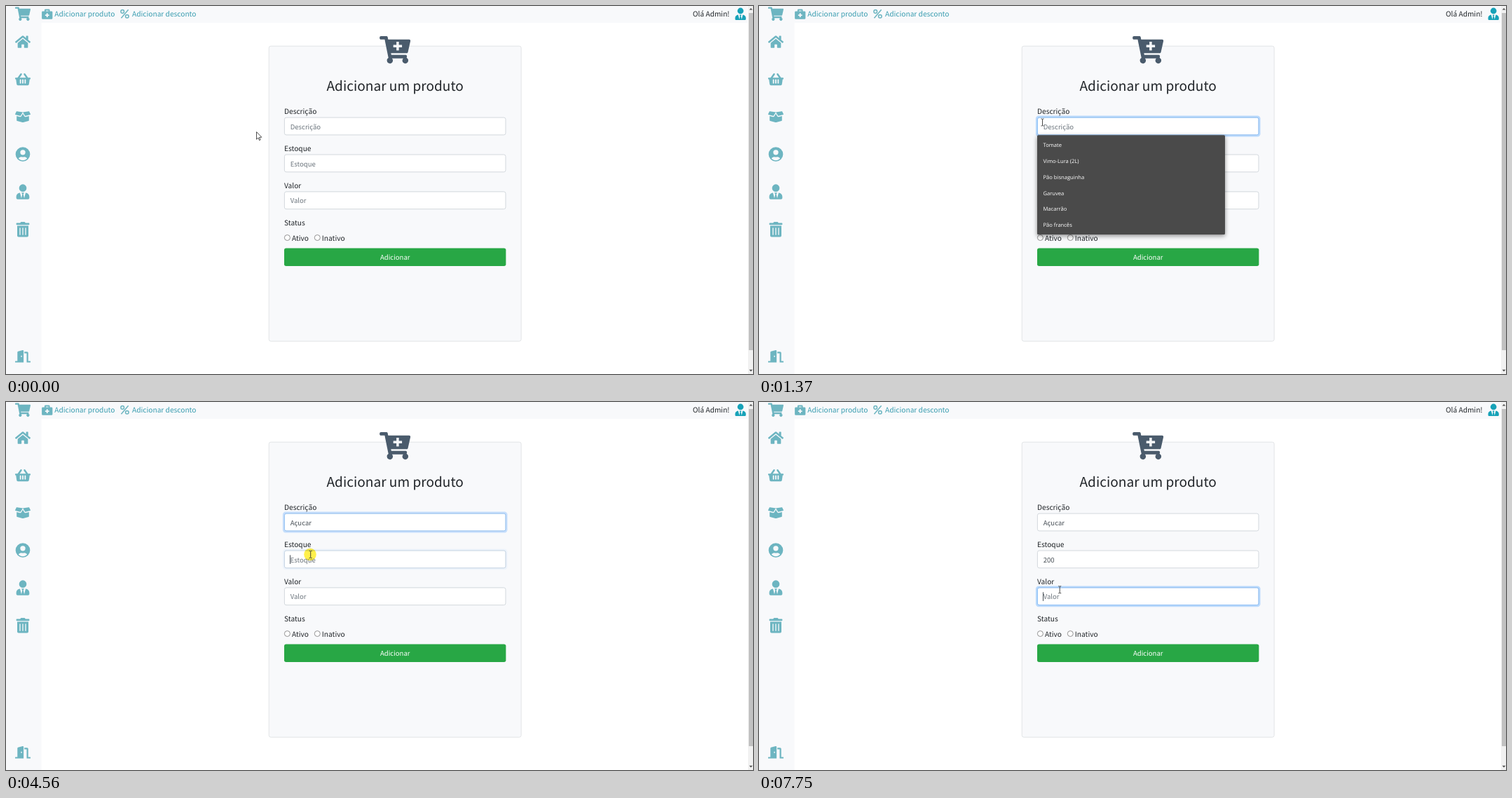
Recreate the animation shown at these times as an HTML page with a canvas. Size 1066 by 525 pixels, loop 8000 ms.

```html
<!DOCTYPE html>
<html lang="pt">
<head>
<meta charset="utf-8">
<title>Adicionar um produto</title>
<style>
html, body { margin: 0; width: 100%; height: 100%; overflow: hidden; background: #fff; }
canvas { display: block; width: 1066px; height: 525px; }
</style>
</head>
<body>
<canvas id="stage"></canvas>
<script>
const W = 1066, H = 525, LOOP = 8000;
const canvas = document.getElementById('stage');
const dpr = window.devicePixelRatio || 1;
canvas.width = W * dpr;
canvas.height = H * dpr;
const ctx = canvas.getContext('2d');

const SANS = '"Noto Sans CJK JP", "Noto Sans CJK SC", "Noto Sans CJK KR", "Noto Sans CJK", sans-serif';
const MENU = '"Open Sans", "Noto Sans", sans-serif';
const PANEL = '#f8f9fb', TEAL = '#6db5c1', LINK = '#3a9db0', INK = '#212529';
const LABEL = 10.18, FIELD = 9.55, TITLE = 19.1;

const ICONS = {
  cart: 'M528 301l47-208C579 78 567 64 552 64H159l-9-45C148 8 138 0 127 0H24C11 0 0 11 0 24v16c0 13 11 24 24 24h70l70 343c-17 10-28 28-28 49a56 56 0 1 0 95-40h210a56 56 0 1 0 63-10l6-25c3-15-8-29-23-29H218l-7-32h294c11 0 20-8 23-19z',
  home: 'M281 150L96 302v164a16 16 0 0 0 16 16h112a16 16 0 0 0 16-16v-96a16 16 0 0 1 16-16h64a16 16 0 0 1 16 16v96a16 16 0 0 0 16 16h112a16 16 0 0 0 16-16V302L295 150a12 12 0 0 0-14 0zM572 251l-84-69V44a12 12 0 0 0-12-12h-56a12 12 0 0 0-12 12v72l-90-74a48 48 0 0 0-60 0L4 251a12 12 0 0 0-2 17l26 31a12 12 0 0 0 17 2L281 108a12 12 0 0 1 14 0l236 193a12 12 0 0 0 17-2l26-31a12 12 0 0 0-2-17z',
  basket: 'M576 216v16c0 13-11 24-24 24h-8l-26 182a48 48 0 0 1-47 42H105a48 48 0 0 1-47-42L32 256h-8c-13 0-24-11-24-24v-16c0-13 11-24 24-24h67L198 45a32 32 0 0 1 52 38L171 192h234L326 83a32 32 0 0 1 52-38l107 147h67c13 0 24 11 24 24z' + slots([176, 264, 352], 48, 280, 112),
  box: 'M426 256c-17 0-33-9-41-23L320 126l-65 107c-8 14-24 23-41 23-4 0-9-1-13-2L64 215v178c0 15 10 28 24 31l216 54c10 2 21 2 31 0l217-54c14-4 24-17 24-31V215l-137 39c-4 1-9 2-13 2zM638 135L586 32c-3-6-10-10-17-9L320 55l91 151c4 6 12 9 18 7l198-56c10-3 16-14 11-22zM53 32L2 135c-5 9 1 20 11 23l198 56c7 2 14-1 18-7L320 55 71 23c-7-1-14 3-18 9z',
  user: 'M0 256a248 248 0 1 0 496 0a248 248 0 1 0-496 0zM160 192a88 88 0 1 0 176 0a88 88 0 1 0-176 0zM248 464c-58 0-111-24-149-63 18-33 54-57 95-57 14 0 24 10 54 10s40-10 54-10c42 0 77 24 95 57-38 39-91 63-149 63z',
  tie: 'M224 256a128 128 0 1 0 0-256 128 128 0 0 0 0 256zM320 289l-47 191-33-140 32-52h-96l32 52-33 140-47-191C56 292 0 350 0 422v42c0 26 21 48 48 48h352c27 0 48-22 48-48v-42c0-72-57-130-128-133z',
  trash: 'M32 464a48 48 0 0 0 48 48h288a48 48 0 0 0 48-48V128H32zM432 32H312l-9-19A24 24 0 0 0 281 0H167a24 24 0 0 0-22 13l-9 19H16A16 16 0 0 0 0 48v32a16 16 0 0 0 16 16h416a16 16 0 0 0 16-16V48a16 16 0 0 0-16-16z' + slots([112, 208, 304], 32, 208, 224),
  door: 'M624 448h-80V113c0-27-21-49-47-49H384v64h96v384h144c9 0 16-7 16-16v-32c0-9-7-16-16-16zM312 2L120 50c-14 4-24 17-24 32v366H16c-9 0-16 7-16 16v32c0 9 7 16 16 16h336V33c0-21-20-36-40-31zM264 288c-13 0-24-14-24-32s11-32 24-32 24 14 24 32-11 32-24 32z',
  kit: 'M464 128h-80V80a48 48 0 0 0-48-48H176a48 48 0 0 0-48 48v48H48a48 48 0 0 0-48 48v288a48 48 0 0 0 48 48h416a48 48 0 0 0 48-48V176a48 48 0 0 0-48-48zM192 96h128v32H192zM352 352h-64v64h-64v-64h-64v-64h64v-64h64v64h64z'
};
for (const name in ICONS) ICONS[name] = new Path2D(ICONS[name]);

// Rounded vertical cut-outs
function slots(xs, w, y, h) {
  const r = w / 2;
  return xs.map(x => `M${x} ${y}a${r} ${r} 0 0 1 ${w} 0v${h}a${r} ${r} 0 0 1 ${-w} 0z`).join('');
}

// Icon name, units wide, scale, centre y
const SIDEBAR = [
  ['cart', 576, .0382, 11.2], ['home', 576, .0382, 51], ['basket', 576, .0382, 104.6],
  ['box', 640, .0344, 158.3], ['user', 496, .0417, 211.5], ['tie', 448, .0417, 265],
  ['trash', 448, .0417, 318.8], ['door', 640, .0344, 499.8]
];

const BOX = { x: 397, w: 316.4, h: 25.6 };
const FIELDS = [
  { name: 'Descrição', y: 158.7, from: 750, to: 4520,
    typed: [[1600, 'A'], [1910, 'Aç'], [3120, 'Açu'], [3200, 'Açuc'], [3270, 'Açuca'], [3440, 'Açucar']] },
  { name: 'Estoque', y: 211.6, from: 4520, to: 6540,
    typed: [[4850, '2'], [5500, '20'], [5650, '200']] },
  { name: 'Valor', y: 264.5, from: 6540, to: LOOP + 1, typed: [] }
];
const CARET_ON = [[790, 1370], [1600, 2500], [3050, 4010], [4520, 5440], [5500, 6200], [6540, 7200], [7750, LOOP]];
const MENU_ITEMS = ['Tomate', 'Vimo-Lura (2L)', 'Pão bisnaguinha', 'Garuvea', 'Macarrão', 'Pão francês'];
const CLICKS = [[750, 860], [4520, 4640], [6540, 6660]];
// Start, end, steps, bend and destination of each pointer move
const START = [357, 179];
const MOVES = [
  { from: 150, to: 520, steps: 7, bend: 0, end: [404.5, 166] },
  { from: 4050, to: 4290, steps: 5, bend: 0, end: [434.7, 217.5] },
  { from: 5800, to: 6390, steps: 10, bend: 1.5, end: [429.2, 267.8] }
];

const clamp = v => Math.max(0, Math.min(1, v));
const smooth = v => v * v * (3 - 2 * v);
const within = (spans, t) => spans.some(([a, b]) => t >= a && t < b);

function text(str, x, y, size, color, align = 'left', family = SANS) {
  ctx.font = `${size}px ${family}`;
  ctx.textAlign = align;
  ctx.fillStyle = color;
  ctx.fillText(str, x, y);
}

function rect(x, y, w, h, color) {
  ctx.fillStyle = color;
  ctx.fillRect(x, y, w, h);
}

function round(x, y, w, h, r, fill, stroke, lw = 1) {
  ctx.beginPath();
  ctx.roundRect(x, y, w, h, r);
  if (fill) { ctx.fillStyle = fill; ctx.fill(); }
  if (stroke) { ctx.strokeStyle = stroke; ctx.lineWidth = lw; ctx.stroke(); }
}

function circle(x, y, r) {
  ctx.beginPath();
  ctx.arc(x, y, r, 0, Math.PI * 2);
}

function line(color, lw, ...points) {
  ctx.beginPath();
  points.forEach(([x, y], i) => i ? ctx.lineTo(x, y) : ctx.moveTo(x, y));
  ctx.strokeStyle = color;
  ctx.lineWidth = lw;
  ctx.stroke();
}

function icon(name, x, y, scale, color) {
  ctx.save();
  ctx.translate(x, y);
  ctx.scale(scale, scale);
  ctx.fillStyle = color;
  ctx.fill(ICONS[name], 'evenodd');
  ctx.restore();
}

function triangle(x, y, dy) {
  ctx.beginPath();
  ctx.moveTo(x - 2.4, y);
  ctx.lineTo(x + 2.4, y);
  ctx.lineTo(x, y + dy);
  ctx.fillStyle = '#505050';
  ctx.fill();
}

function drawPercent(x, y) {
  line(TEAL, 1.5, [x + 1.4, y + 12.6], [x + 11.6, y + .6]);
  for (const [cx, cy] of [[3.2, 3.2], [9.8, 10]]) {
    circle(x + cx, y + cy, 2.3);
    ctx.lineWidth = 1.5;
    ctx.stroke();
  }
}

function drawChrome() {
  rect(0, 0, W, H, '#fff');
  rect(0, 0, 1058.5, 24, PANEL);
  rect(0, 0, 50.6, H, PANEL);
  for (const [name, units, scale, cy] of SIDEBAR)
    icon(name, 24 - units * scale / 2, cy - 256 * scale, scale, TEAL);

  icon('kit', 51.1, 3.6, .0298, TEAL);
  text('Adicionar produto', 69.2, 15, LABEL, LINK);
  drawPercent(163, 4.7);
  text('Adicionar desconto', 180, 15, LABEL, LINK);
  text('Olá Admin!', 980, 15, LABEL, INK);
  icon('tie', 1040.5, 2.6, .0342, '#17a2b8');

  rect(1059, 0, 7, H, '#f1f1f1');
  rect(1060, 10, 6, 481, '#c1c1c1');
  triangle(1063, 5.5, -2.6);
  triangle(1063, 518.8, 2.6);
}

function drawCard() {
  round(375.2, 57.2, 360, 421, 2.7, PANEL, '#dfe2e5', .9);
  icon('cart', 533.2, 42.9, .0764, '#4a5b6c');
  line(PANEL, 3.5, [552.7, 57.2], [565.1, 57.2]);
  line(PANEL, 3.5, [558.9, 51], [558.9, 63.4]);
  text('Adicionar um produto', 555.2, 120.6, TITLE, INK, 'center');

  text('Status', 397, 313, LABEL, INK);
  for (const [x, label] of [[401.4, 'Ativo'], [444.3, 'Inativo']]) {
    circle(x, 330.5, 4);
    ctx.fillStyle = '#fff';
    ctx.fill();
    ctx.strokeStyle = '#767676';
    ctx.lineWidth = .8;
    ctx.stroke();
    text(label, x + 6.5, 335, LABEL, INK);
  }
  round(397, 345.6, 316.4, 25.4, 2.7, '#28a745');
  text('Adicionar', 555.2, 362.2, FIELD, '#fff', 'center');
}

function drawField(f, t) {
  const { x, w, h } = BOX;
  const on = smooth(clamp((t - f.from) / 150));
  const off = smooth(clamp((t - f.to) / 150));
  const focus = on - off;
  const value = f.typed.reduce((v, [at, s]) => t >= at ? s : v, '');
  const base = f.y + 16.9;

  text(f.name, x, f.y - 4.6, LABEL, INK);
  if (focus > 0) round(x - 2.1, f.y - 2.1, w + 4.2, h + 4.2, 4.2, `rgba(0,123,255,${.25 * focus})`);
  round(x + .4, f.y + .4, w - .8, h - .8, 2.6, '#fff', '#ced4da', .9);
  if (focus > 0) round(x + .4, f.y + .4, w - .8, h - .8, 2.6, null, `rgba(128,189,255,${focus})`, .9);
  text(value || f.name, x + 8.7, base, FIELD, value ? '#495057' : '#6c757d');

  if (t >= f.from && t < f.to && within(CARET_ON, t)) {
    const end = value ? ctx.measureText(value).width : 0;
    rect(Math.floor(x + 8.7 + end), f.y + 6.8, 1, 12.6, '#495057');
  }
}

function drawMenu() {
  ctx.save();
  ctx.shadowColor = 'rgba(0,0,0,.45)';
  ctx.shadowBlur = 6 * dpr;
  ctx.shadowOffsetY = 2 * dpr;
  round(397, 184.2, 268, 141.8, 1.5, '#4a4a4a');
  ctx.restore();
  MENU_ITEMS.forEach((item, i) => text(item, 405.5, 201.4 + i * 22.75, 7.6, '#fff', 'left', MENU));
}

function pointerAt(t) {
  let pos = START;
  for (const m of MOVES) {
    if (t < m.from) break;
    const gap = (m.to - m.from) / (m.steps - 1);
    const p = smooth(clamp((Math.floor((t - m.from) / gap + 1e-6) + 1) / m.steps));
    const [x, y] = pos;
    pos = [x + (m.end[0] - x) * p + m.bend * Math.sin(Math.PI * p), y + (m.end[1] - y) * p];
  }
  return pos;
}

function drawBeam(x, y) {
  const c = '#333';
  line(c, .9, [x, y - 4.4], [x, y + 4.4]);
  for (const s of [-1, 1])
    line(c, .9, [x - 2, y + s * 5], [x - .6, y + s * 5], [x, y + s * 4.4], [x + .6, y + s * 5], [x + 2, y + s * 5]);
}

function drawArrow(x, y) {
  ctx.beginPath();
  ctx.moveTo(x + .5, y + .6);
  for (const [dx, dy] of [[0, 10.6], [2.4, 8.4], [4, 12], [5.6, 11.3], [4, 7.8], [7.3, 7.6]])
    ctx.lineTo(x + .5 + dx, y + .6 + dy);
  ctx.closePath();
  ctx.fillStyle = '#fff';
  ctx.fill();
  ctx.strokeStyle = '#222';
  ctx.lineWidth = .8;
  ctx.stroke();
}

function drawPointer(t) {
  const [x, y] = pointerAt(t);
  if (within(CLICKS, t)) {
    ctx.save();
    ctx.globalCompositeOperation = 'multiply';
    circle(x - .7, y, 8.8);
    ctx.fillStyle = '#fff04c';
    ctx.fill();
    ctx.restore();
  }
  const inField = x >= BOX.x && FIELDS.some(f => y >= f.y && y <= f.y + BOX.h);
  (inField ? drawBeam : drawArrow)(x, y);
}

function draw(t) {
  ctx.setTransform(dpr, 0, 0, dpr, 0, 0);
  ctx.textRendering = 'geometricPrecision';
  drawChrome();
  drawCard();
  FIELDS.forEach(f => drawField(f, t));
  if (t >= 860 && t < 1600) drawMenu();
  drawPointer(t);
}

let begin;
function tick(now) {
  begin ??= now;
  draw((now - begin) % LOOP);
  requestAnimationFrame(tick);
}
draw(0);
requestAnimationFrame(tick);
</script>
</body>
</html>
```
